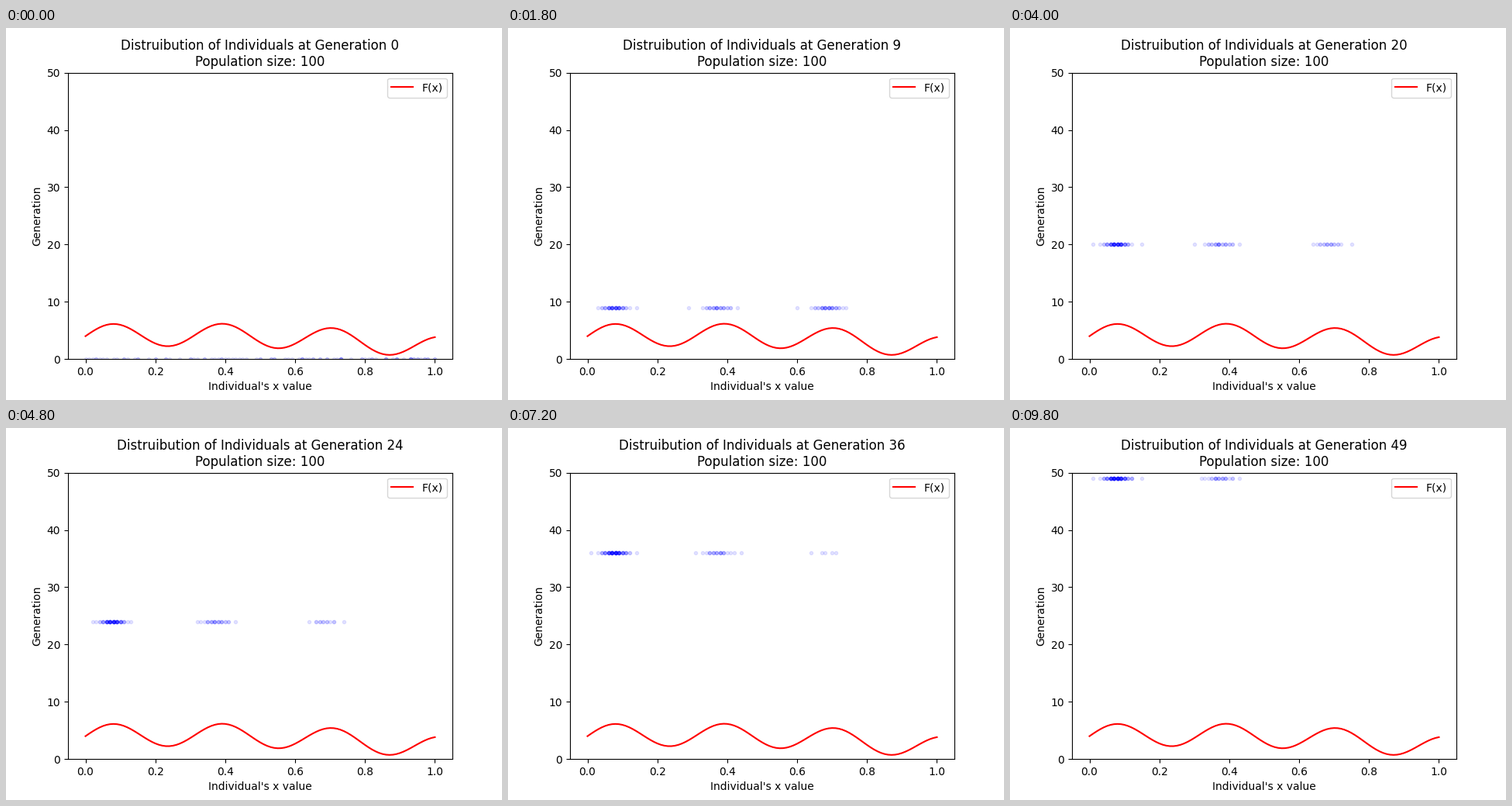
Write a matplotlib script that moves like this. It is 640x480 px and loops after 10000 ms.

```python
import numpy as np
import matplotlib.pyplot as plt
from matplotlib.animation import FuncAnimation

SIZE = 100
GENERATIONS = 50

# One cluster per peak of the curve
CENTERS = (0.077, 0.372, 0.685)
SPREADS = (0.012, 0.016, 0.015)


def fitness(x):
    return 4 + 2 * x - 4 * x**2 + 2 * np.sin(20 * x)


def cluster_sizes(gen, total):
    """The left peak gradually wins, the right one dies out."""
    left = np.interp(gen, [5, 28, 49], [0.38, 0.68, 0.78])
    right = np.interp(gen, [5, 28, 49], [0.36, 0.08, 0])
    n_left, n_right = round(left * total), round(right * total)
    return n_left, total - n_left - n_right, n_right


def cluster(rng, center, spread, n):
    """Evenly stratified draws from a logistic bell."""
    u = (np.arange(n) + rng.uniform(0.1, 0.9, n)) / max(n, 1)
    return center + spread * np.log(u / (1 - u))


def population(gen):
    rng = np.random.default_rng(gen)
    strays = round(SIZE * 0.35**gen)
    sizes = cluster_sizes(gen, SIZE - strays)
    widen = 1 + 0.5**gen
    groups = [rng.random(strays)]
    for center, spread, n in zip(CENTERS, SPREADS, sizes):
        groups.append(cluster(rng, center, spread * widen, n))
    return np.clip(np.concatenate(groups), 0, 1).round(2)


fig, ax = plt.subplots(figsize=(6.4, 4.8), dpi=100)
x = np.linspace(0, 1, 101)
ax.plot(x, fitness(x), color="red", label="F(x)")
dots, = ax.plot([], [], "b.", alpha=0.1)
ax.set_xlim(-0.05, 1.05)
ax.set_ylim(0, GENERATIONS)
ax.set_xlabel("Individual's x value")
ax.set_ylabel("Generation")
ax.legend(loc="upper right")


def draw(gen):
    dots.set_data(population(gen), np.full(SIZE, gen))
    ax.set_title(f"Distruibution of Individuals at Generation {gen}\n"
                 f"Population size: {SIZE}")
    return dots,


def reset():
    return draw(0)


anim = FuncAnimation(fig, draw, frames=GENERATIONS, init_func=reset,
                     interval=200, repeat=True, repeat_delay=0, blit=False)
plt.show()
```
